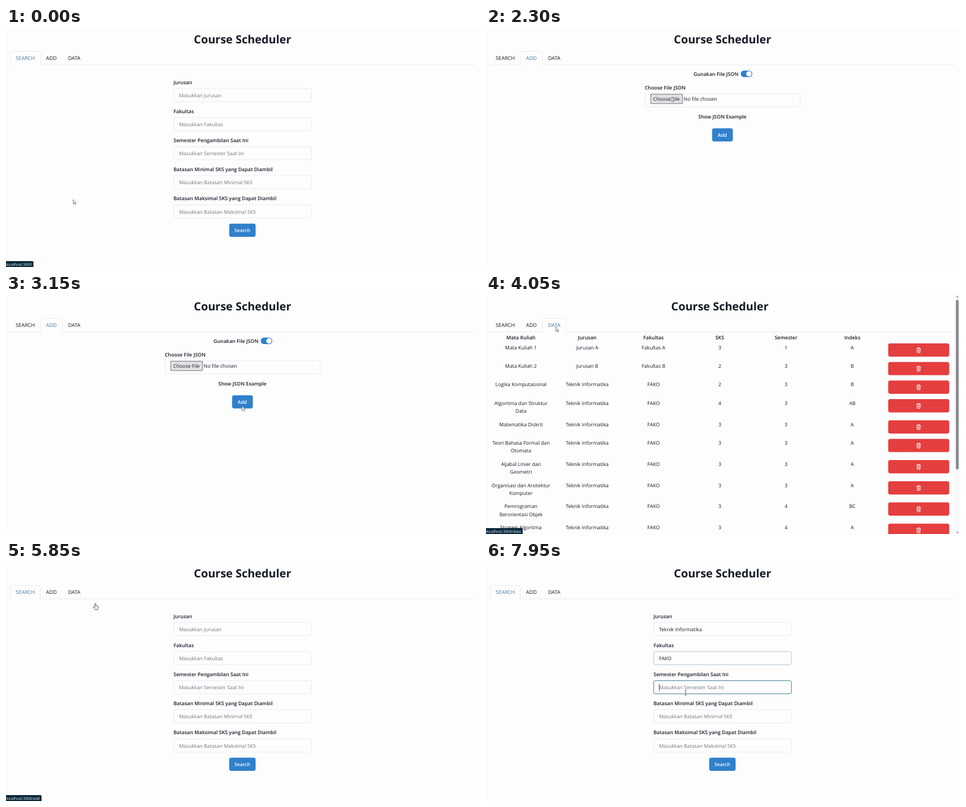
These frames come from a looping animation (800x404 px, 8 s). An HTML page with a canvas:

```html
<!DOCTYPE html>
<html lang="id">
<head>
<meta charset="utf-8">
<title>Course Scheduler</title>
<style>
html, body { margin: 0; width: 100%; height: 100%; overflow: hidden; background: #fdfdfe; }
canvas { display: block; width: 800px; height: 404px; }
</style>
</head>
<body>
<canvas id="stage"></canvas>
<script>
const LOOP = 8000;
const INK = '#161b25', LINE = '#e2e8f0', BLUE = '#3080cc', HINT = '#70757c', PAPER = '#fdfdfe';
const canvas = document.getElementById('stage');
const ratio = window.devicePixelRatio || 1;
canvas.width = 800 * ratio;
canvas.height = 404 * ratio;
const ctx = canvas.getContext('2d');

// [time, x, y, shape]; the shape holds until the next key
const pointerKeys = [
  [0, 113.5, 290, 'arrow'], [350, 113.5, 290, 'arrow'], [1100, 77, 48.5, 'hand'],
  [1600, 77, 48.5, 'arrow'], [1900, 440, 75, 'hand'], [2050, 440, 75, 'arrow'],
  [2350, 303, 120, 'arrow'], [2550, 303, 120, 'arrow'], [2750, 142, 27, 'arrow'],
  [2880, 142, 27, 'arrow'], [3080, 398.5, 187.8, 'arrow'], [3450, 398.5, 187.8, 'arrow'],
  [3850, 115, 48.5, 'hand'], [4000, 115, 48.5, 'arrow'], [4400, 175.5, 177, 'arrow'],
  [5250, 175.5, 177, 'arrow'], [5550, 32, 48.5, 'hand'], [5680, 32, 48.5, 'hand'],
  [5850, 149, 70, 'hand'], [5900, 160, 73, 'arrow'], [6250, 337, 113, 'beam'],
  [7150, 337, 113, 'beam'], [7350, 337, 163, 'beam'], [7700, 337, 163, 'beam'],
  [7830, 337, 221, 'beam'], [8000, 337, 221, 'beam']
];
const scrollKeys = [[0, 0], [4350, 0], [4700, 98], [4900, 143], [5050, 143], [5350, 0], [8000, 0]];

const searchFields = [
  ['Jurusan', 'Masukkan Jurusan'],
  ['Fakultas', 'Masukkan Fakultas'],
  ['Semester Pengambilan Saat Ini', 'Masukkan Semester Saat Ini'],
  ['Batasan Minimal SKS yang Dapat Diambil', 'Masukkan Batasan Minimal SKS'],
  ['Batasan Maksimal SKS yang Dapat Diambil', 'Masukkan Batasan Maksimal SKS']
];
const focusTimes = [6350, 7380, 7850, Infinity];
const entries = [['Teknik Informatika', 6450, 38], ['FAKO', 7430, 60]];

const courses = [
  ['Mata Kuliah 1', 3, 1, 'A', 'Jurusan A', 'Fakultas A'],
  ['Mata Kuliah 2', 2, 3, 'B', 'Jurusan B', 'Fakultas B'],
  ['Logika Komputasional', 2, 3, 'B'],
  ['Algoritma dan Struktur|Data', 4, 3, 'AB'],
  ['Matematika Diskrit', 3, 3, 'A'],
  ['Teori Bahasa Formal dan|Otomata', 3, 3, 'A'],
  ['Aljabal Linier dan|Geometri', 3, 3, 'A'],
  ['Organisasi dan Arsitektur|Komputer', 3, 3, 'A'],
  ['Pemrograman|Berorientasi Objek', 3, 4, 'BC'],
  ['Strategi Algoritma', 3, 4, 'A'],
  ['Probabilitas dan Statistika', 3, 4, 'B'],
  ['Sistem Operasi', 3, 4, 'B'],
  ['Basis Data', 3, 4, 'AB'],
  ['Jaringan Komputer', 3, 5, 'B']
];

// Value list at time t, eased between neighbouring keys
function sample(keys, t) {
  const next = keys.findIndex(key => key[0] > t);
  const a = keys[next - 1], b = keys[next];
  const p = (t - a[0]) / (b[0] - a[0]);
  const eased = p * p * (3 - 2 * p);
  return a.map((v, i) => typeof v === 'number' ? v + (b[i] - v) * eased : v);
}

// y is the middle of the capitals
function text(str, x, y, { size = 8.4, weight = 400, color = INK, align = 'left' } = {}) {
  ctx.font = `${weight} ${size}px "Open Sans", sans-serif`;
  ctx.textAlign = align;
  ctx.fillStyle = color;
  ctx.fillText(str, x, y + size * 0.357);
}
const label = (str, x, y, style) => text(str, x, y, { size: 8.45, weight: 600, ...style });

function box(x, y, w, h, { fill, stroke, radius = 0, line = 0.8 } = {}) {
  ctx.beginPath();
  ctx.roundRect(x, y, w, h, radius);
  if (fill) { ctx.fillStyle = fill; ctx.fill(); }
  if (stroke) { ctx.strokeStyle = stroke; ctx.lineWidth = line; ctx.stroke(); }
}

function path(d, stroke, line = 0.8, fill) {
  const shape = new Path2D(d);
  if (fill) { ctx.fillStyle = fill; ctx.fill(shape); }
  if (stroke) { ctx.strokeStyle = stroke; ctx.lineWidth = line; ctx.stroke(shape); }
}

function button(str, x, y, w) {
  box(x, y, w, 22.2, { fill: BLUE, radius: 3.4 });
  label(str, x + w / 2 - 0.2, y + 11.2, { size: 8.2, color: '#fff', align: 'center' });
}

function header(active, center = 399) {
  label('Course Scheduler', center + 0.2, 19.7, { size: 18.95, weight: 700, align: 'center' });
  const right = center * 2 - 7;
  const tabs = [['SEARCH', 7, 58], ['ADD', 58, 95], ['DATA', 95, 135]];
  const [, left, end] = tabs[active];
  path(`M7 62.3H${left}V42.5q0-3 3-3H${end - 3}q3 0 3 3V62.3H${right}`, LINE);
  tabs.forEach(([name, a, b], i) =>
    text(name, (a + b) / 2, 51.2, { size: 8.7, align: 'center', color: i === active ? '#41799f' : INK }));
}

function searchPage(t) {
  header(0);
  searchFields.forEach(([name, hint], i) => {
    const y = i * 49.2;
    label(name, 282.8, 91.6 + y);
    box(283, 102.2 + y, 232.5, 22.2, { stroke: LINE, radius: 3.2 });
    const start = focusTimes[i], stop = focusTimes[i + 1];
    const focused = t >= start && t < stop;
    const glow = focused ? 1 : t >= stop ? Math.max(0, 1 - (t - stop) / 150) : 0;
    if (glow) {
      ctx.globalAlpha = glow;
      box(283, 102.2 + y, 232.5, 22.2, { stroke: '#4d8797', radius: 3.2, line: 1 });
      ctx.globalAlpha = 1;
    }
    const [word, from, pace] = entries[i] || ['', 0, 1];
    const typed = word.slice(0, Math.max(0, Math.floor((t - from) / pace)));
    text(typed || hint, 292, 113.8 + y, { color: typed ? INK : HINT });
    if (focused) {
      const caret = 292.4 + (typed ? ctx.measureText(typed).width : 0);
      path(`M${caret} ${107.5 + y}v12`, INK, 0.7);
    }
  });
  button('Search', 376.7, 330.8, 44.6);
}

function addPage(t) {
  const on = t >= 1980;
  header(1);
  label('Gunakan File JSON', 426, 78, { align: 'right' });
  box(430, 72, 19.4, 11, { fill: on ? BLUE : '#cbd5e0', radius: 5.5 });
  box(on ? 439.3 : 431, 73, 9, 9, { fill: '#fff', radius: 4.5 });
  if (!on) return;
  label('Choose File JSON', 268, 100.5);
  box(268.4, 111.2, 261.8, 22, { stroke: LINE, radius: 3.2 });
  box(278, 112, 53.4, 15.8, { fill: '#e2e2e3', stroke: '#55585d' });
  text('Choose File', 304.7, 120.2, { align: 'center' });
  text(t < 3200 ? 'No file chosen' : 'tes2.json', 333.6, 120.2, { size: 8.5 });
  label('Show JSON Example', 399, 149.8, { align: 'center' });
  button('Add', 381.6, 169.5, 35);
}

function fileDialog(t) {
  const chosen = t >= 2860;
  const pale = { size: 6.5, color: '#e4e4e4' };
  ctx.save();
  ctx.shadowColor = 'rgba(0,0,0,.35)';
  ctx.shadowBlur = 7 * ratio;
  ctx.shadowOffsetY = 2 * ratio;
  box(-10, -10, 505, 214.5, { fill: '#333336' });
  ctx.restore();
  box(0, 0, 495, 158.5, { fill: '#202021' });
  box(0, 0, 70, 158.5, { fill: '#1a1a1b' });

  box(0, 127, 60, 12.5, { fill: '#353536' });
  box(60, 0, 9.5, 158.5, { fill: '#171718' });
  box(60.5, 85, 8.5, 63, { fill: '#4c4c4d' });
  path('M62.5 152.5l2.2 2.2 2.2-2.2M62.5 3l2.2-2.2 2.2 2.2', '#aaa');
  text('Nimbolet - Personal', 0, 8.2, pale);
  text('This PC', 0, 26, pale);
  ['3D Objects', 'Desktop', 'Documents', 'Downloads', 'Music', 'Pictures', 'Videos', 'OS (C:)'].forEach((name, i) => {
    const y = 39.4 + i * 13.4;
    text(name, 4.5, y, pale);
    box(0, y - 2.5, 1.6, 5, { fill: i < 2 || i === 6 ? '#3695cf' : '#b9bec2' });
  });
  text('Network', 0, 151.3, pale);

  [['Name', 81], ['Date modified', 226.5], ['Type', 307], ['Size', 374.5]].forEach(([name, x]) => text(name, x, 4.2, pale));
  [223.5, 304, 371.5, 416].forEach(x => path(`M${x} 0v12.5`, '#505052', 0.7));
  box(79.5, 27, 335, 12.2, { fill: chosen ? '#727274' : '#4a4a4c' });
  [['tes1.json', '22/07/2023 16:40', '1 KB'], ['tes2.json', '25/07/2023 13:38', '3 KB']].forEach(([name, date, size], i) => {
    const y = 20.8 + i * 12.4;
    box(83.5, y - 4, 5.8, 8, { fill: '#f1f1f1' });
    path(`M85 ${y - 1.5}h2.5m-2.5 2h2.5`, '#888', 0.6);
    text(name, 93, y, pale);
    text(date, 226.5, y, { ...pale, size: 6.4 });
    text('JSON Source File', 307, y, pale);
    text(size, 411.5, y, { ...pale, align: 'right' });
  });

  text('File name:', 72, 172.8, { ...pale, align: 'right' });
  box(74.5, 166.5, 299.5, 12.6, { fill: '#38383b', stroke: '#bcbcbc' });
  box(380.5, 166.5, 105.2, 12.6, { fill: '#38383b', stroke: '#9b9b9c' });
  if (chosen) text('tes2.json', 77, 172.8, pale);
  text('Velmo Motion Layers JSON (*.jso', 382.5, 172.8, { ...pale, size: 6.2 });
  path('M367.5 172l2 2 2-2M479 172l2 2 2-2', '#ccc', 0.7);
  box(380.8, 183, 49, 13.8, { stroke: '#f0f0f0', line: 1 });
  path('M421.3 183v13.8', '#f0f0f0');
  path('M423.3 188.8h4.4l-2.2 2.6z', null, 0, '#eee');
  box(436.6, 183, 49, 13.8, { stroke: '#c5c5c6' });
  text('Open', 400.5, 189.8, { ...pale, align: 'center' });
  text('Cancel', 461, 189.8, { ...pale, align: 'center' });
  path('M489 202.5l4.5-4.5M491.5 202.5l2-2', '#bbb', 1);
}

function trash(x, y) {
  path(`M${x - 3.7} ${y - 2.8}h7.4M${x - 1.4} ${y - 2.8}v-1.4h2.8v1.4M${x - 2.8} ${y - 2.8}l.4 7h4.8l.4-7M${x - 0.9} ${y - 1.2}v4M${x + 0.9} ${y - 1.2}v4`, '#fff', 0.9);
}

function dataPage(scroll) {
  const centered = { align: 'center' };
  const column = i => 59 + i * 111.85;
  ctx.save();
  ctx.translate(0, -scroll);
  header(2, 394.5);
  ['Mata Kuliah', 'Jurusan', 'Fakultas', 'SKS', 'Semester', 'Indeks'].forEach((name, i) => label(name, column(i), 72, centered));
  let y = 81.8;
  for (const [name, credits, term, grade, major = 'Teknik Informatika', faculty = 'FAKO'] of courses) {
    const lines = name.split('|');
    lines.forEach((line, i) => text(line, column(0), y + 6.9 + i * 13.4, centered));
    [major, faculty, credits, term, grade].forEach((value, i) => text(value, column(i + 1), y + 6.9, centered));
    box(678.8, y, 103, 22.4, { fill: '#e53e3e', radius: 3.4 });
    trash(730.2, y + 11.4);
    y += lines.length > 1 ? 35.8 : 31.4;
  }
  ctx.restore();
  box(791, 0, 9, 404, { fill: '#f8f8f9' });
  box(793, 8 + scroll * 0.711, 4.8, 287, { fill: '#8c8c8e', radius: 2.4 });
  path('M793.5 4l2-2.5 2 2.5zM793.5 400.5l2 2.5 2-2.5z', null, 0, '#858587');
}

function statusBar(str) {
  const style = { size: 6.35, weight: 500, color: '#f4f8fa' };
  ctx.font = `${style.weight} ${style.size}px "Open Sans", sans-serif`;
  box(-2, 394, ctx.measureText(str).width + 5.6, 12, { fill: '#09283b', radius: [0, 2, 0, 0] });
  text(str, 0.5, 399.8, style);
}

function pointer([, x, y, shape]) {
  ctx.save();
  ctx.translate(x, y);
  if (shape === 'arrow') {
    path('M0 0v7.3l1.7-1.6 1.2 2.8 1.2-.5-1.2-2.7h2.4z', '#55565a', 0.7, '#fff');
  } else if (shape === 'hand') {
    path('M1 1.2q0-1.2.9-1.2t.9 1.2V4l3 .7q1 .3.9 1.4L6.2 8.6 5.6 10.6H1.7L-1.2 7q-.8-1.2.3-1.5L1 6.6z', '#333', 0.8, '#fff');
  } else {
    path('M-1.7-4q1.7 0 1.7.8 0-.8 1.7-.8M0-3.2v6.6M-1.7 4.2q1.7 0 1.7-.8 0 .8 1.7.8', '#333', 0.7);
  }
  ctx.restore();
}

function draw(t) {
  ctx.setTransform(ratio, 0, 0, ratio, 0, 0);
  ctx.textRendering = 'geometricPrecision';
  box(0, 0, 800, 404, { fill: PAPER });
  if (t < 1600 || t >= 5650) searchPage(t);
  else if (t < 3950) addPage(t);
  else dataPage(sample(scrollKeys, t)[1]);
  if (t >= 2550 && t < 3120) fileDialog(t);

  if (t < 400 || (t >= 5550 && t < 5780)) statusBar('localhost:3000');
  else if ((t >= 1050 && t < 1700) || (t >= 5780 && t < 6150)) statusBar('localhost:3000/add');
  else if (t >= 3850 && t < 4150) statusBar('localhost:3000/data');
  pointer(sample(pointerKeys, t));
}

const begin = performance.now();
function tick() {
  draw((performance.now() - begin) % LOOP);
  requestAnimationFrame(tick);
}
tick();
</script>
</body>
</html>
```
